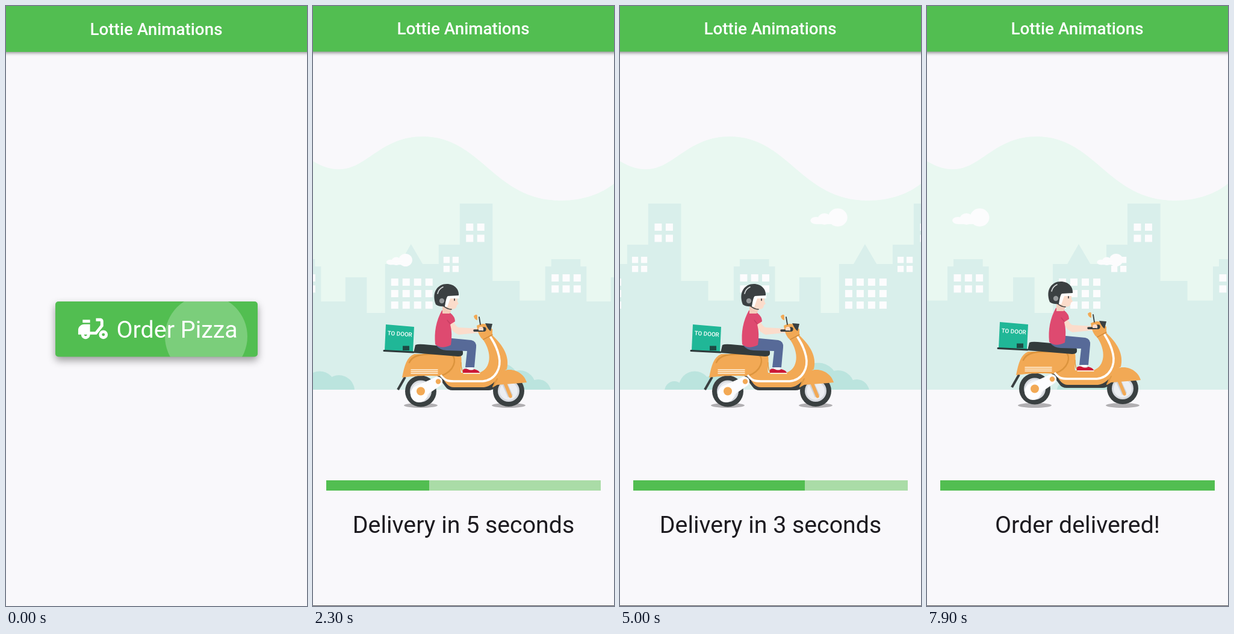
An HTML page with a canvas that plays this animation: 500 by 993 pixels, repeating every 8 s.

```html
<!DOCTYPE html>
<html lang="en">
<head>
<meta charset="utf-8">
<title>Lottie Animations</title>
<style>
html, body { margin: 0; width: 100%; height: 100%; overflow: hidden; background: #f9f8fb; }
canvas { position: absolute; left: 0; top: 0; width: 500px; height: 993px; display: block; }
</style>
</head>
<body>
<canvas id="home" width="500" height="993"></canvas>
<canvas id="order" width="500" height="993"></canvas>
<script>
const LOOP = 8, W = 500, H = 993, GROUND = 635;
const PAGE = '#f9f8fb', GREEN = '#52be51', DARK = '#3a4041', ORANGE = '#f2a955';
const SKIN = '#fbdccb', CITY = '#d9efeb', PALE = '#fcfcfd';
const home = document.getElementById('home').getContext('2d');
const orderCanvas = document.getElementById('order');
const order = orderCanvas.getContext('2d');
let g = home;

const clamp = v => Math.max(0, Math.min(1, v));
const mod = (a, b) => ((a % b) + b) % b;

function rect(x, y, w, h, color) {
  g.fillStyle = color;
  g.fillRect(x, y, w, h);
}
function oval(x, y, rx, ry, color) {
  g.fillStyle = color;
  g.beginPath();
  g.ellipse(x, y, rx, ry, 0, 0, Math.PI * 2);
  g.fill();
}
const dot = (x, y, r, color) => oval(x, y, r, r, color);
function shape(d, color) {
  g.fillStyle = color;
  g.fill(new Path2D(d), 'evenodd');
}
function line(d, width, color, cap = 'round') {
  g.strokeStyle = color;
  g.lineWidth = width;
  g.lineCap = cap;
  g.lineJoin = 'round';
  g.stroke(new Path2D(d));
}
function text(s, x, y, size, color, weight = 400, align = 'center') {
  g.font = `${weight} ${size}px Roboto, sans-serif`;
  g.textAlign = align;
  g.fillStyle = color;
  g.fillText(s, x, y);
}
function shadow(alpha, blur, dy) {
  g.shadowColor = `rgba(0,0,0,${alpha})`;
  g.shadowBlur = blur;
  g.shadowOffsetY = dy;
}
function frame(barHeight, baseline) {
  g.clearRect(0, 0, W, H);
  rect(0, 0, W, H, PAGE);
  g.save();
  shadow(.4, 5, 2);
  rect(-10, -10, W + 20, barHeight + 10, GREEN);
  g.restore();
  text('Lottie Animations', 249.5, baseline, 27.8, '#fff', 500);
}

function moped(x, y, scale) {
  g.save();
  g.translate(x, y);
  g.scale(scale, scale);
  shape('M19 7c0-1.1-.9-2-2-2h-3v2h3v2.65L13.52 14H10V9H6c-2.2 0-4 1.8-4 4v3h2c0 1.66 1.34 3 3 3s3-1.34 3-3h4.48L19 10.35zM7 17c-.55 0-1-.45-1-1h2c0 .55-.45 1-1 1z', '#fff');
  rect(5, 6, 5, 2, '#fff');
  dot(19, 16, 3, '#fff');
  dot(19, 16, 1, GREEN);
  g.restore();
}

function drawHome(t) {
  g = home;
  frame(76, 48);
  const button = new Path2D();
  button.roundRect(82, 489, 336, 91.5, 5);
  g.save();
  shadow(.38, 13, 6);
  g.fillStyle = GREEN;
  g.fill(button);
  g.restore();
  g.save();
  g.clip(button);
  dot(332.5, 547, 68 + t * 480, `rgba(255,255,255,${.24 * clamp(1.5 - t * 3)})`);
  g.restore();
  moped(115, 504.5, 2.46);
  text('Order Pizza', 183.5, 548.5, 39.4, '#fff', 400, 'left');
}

// distance the skyline has travelled, as [seconds, px]
const TRAVEL = [[0, -110], [1.5, 0], [3, 111], [4, 179], [5, 256], [6.1, 337], [7.1, 411]];
function travel(t) {
  for (let i = 1; i < TRAVEL.length; i++) {
    const [t0, d0] = TRAVEL[i - 1], [t1, d1] = TRAVEL[i];
    if (t < t1) return d0 + (d1 - d0) * (t - t0) / (t1 - t0);
  }
  return 411;
}

function windows(x, y, cols, rows, step, size) {
  for (let i = 0; i < cols; i++)
    for (let j = 0; j < rows; j++) rect(x + i * step, y + j * step, size, size, PALE);
}

// left, right and top of each block, measured from the tower
const BLOCKS = [[0, 54, 327], [-35, 0, 395], [-124, -35, 427], [54, 99, 455], [99, 142, 487.5],
  [142, 210, 431], [152, 200, 419], [210, 251, 489], [251, 286, 449], [286, 318, 508]];
function skyline(x) {
  g.save();
  g.translate(x, 0);
  g.fillStyle = CITY;
  g.beginPath();
  for (const [l, r, top] of BLOCKS) g.rect(l, top, r - l + .6, GROUND - top);
  g.moveTo(-100.5, 428);
  g.lineTo(-81, 394);
  g.lineTo(-61, 428);
  g.fill();
  windows(10.5, 360, 2, 2, 18.5, 12);
  windows(-27, 415, 2, 2, 15, 10.3);
  windows(-114, 451, 4, 3, 19, 12);
  windows(152.5, 444, 3, 2, 18.3, 12);
  g.restore();
}

function cloud(right, y, k) {
  oval(right - 16 * k, y, 16 * k, 15 * k, PALE);
  oval(right - 38 * k, y + 2.5 * k, 11 * k, 9.5 * k, PALE);
  oval(right - 52 * k, y + 5 * k, 9.5 * k, 6 * k, PALE);
  rect(right - 52 * k, y + 3 * k, 30 * k, 8 * k, PALE);
}

const BIG = [[19, 632, 19], [52, 623, 32.5], [85, 630, 27], [116, 639, 21]];
const SMALL = [[16, 637, 16], [50, 631, 26.5], [82, 637, 26]];
function bush(x, lobes) {
  for (const [dx, y, r] of lobes) dot(x + dx, y, r, '#bbe4de');
}

function scenery(d) {
  shape('M0 257C20 268 32 271 48 270C90 267 115 216 182 216C280 216 300 322 412 322C450 322 480 310 500 294V635H0Z', '#e9f8f1');
  const x = mod(303 - d, 441);
  for (const k of [-1, 0, 1]) skyline(x + k * 441);
  cloud(mod(51 - d * 1.77 + 200, 780) - 200, 350, 1);
  cloud(mod(271 - d * 1.79 + 200, 790) - 200, 420.5, .7);
  g.save();
  g.beginPath();
  g.rect(0, 500, W, GROUND - 500);
  g.clip();
  for (const [start, lobes] of [[427, BIG], [804, SMALL], [1007, BIG], [1387, SMALL]])
    bush(mod(start - d * 2.85 + 200, 1257) - 200, lobes);
  g.restore();
}

function wheel(x, y) {
  dot(x, y, 26, DARK);
  dot(x, y, 18, '#d6d9df');
  dot(x, y, 15, '#eceef2');
}

function box() {
  shape('M121 527L168 531L166 573L119 570Z', '#20b797');
  line('M118 570.5L167 573', 3, '#2e3a3b');
  rect(149, 562.5, 11, 7.5, '#1d4a44');
  g.save();
  g.translate(144, 546);
  g.rotate(.075);
  text('TO DOOR', 0, 0, 9.8, '#fff', 500);
  g.restore();
}

function scooter() {
  line('M153 614L141 635', 4, DARK, 'butt');
  wheel(179, 637.5);
  wheel(325, 637);
  // underside
  shape('M205 610L216 615L224 625H294L312 610L304 630Q299 636 291 636H232Q224 636 220 630Z', DARK);
  // rear cowl, floor and leg shield
  shape('M148 615C152 594 156 581 168 576H245C249 586 244 598 246 607H276C297 600 297 573 283 553L298 545C316 562 327 580 322 601L311 608C304 622 294 630 284 631H234C225 631 220 624 214 613C194 611 170 612 154 614Z', ORANGE);
  line('M160 590C166 577 182 576 200 576H230C240 585 235 604 213 612', 2.6, '#dc943d');
  for (const y of [602, 605, 608]) line(`M163 ${y}H207`, 1.5, '#fff4e2');
  line('M213 612C219 620 224 621 234 621H282C304 619 313 598 309 580C306 565 300 556 295 548', 3.6, '#fff');
  line('M246 590Q246 604 251 608H278', 1.4, '#e39b43');
  // swing arm
  shape('M169 630L202 615A8 8 0 0 1 212 628L190 643A14 14 0 1 1 169 630Z', '#fdfdff');
  dot(179, 637.5, 7, ORANGE);
  dot(208, 621.5, 4.2, ORANGE);
  // front fork and fender
  line('M317 622L328 646', 9, '#cfd2d8', 'butt');
  line('M318 622L328 646', 5.5, ORANGE);
  shape('M299 631C303 612 312 602 326 602C341 602 352 612 355 623L345 624L306 627Z', ORANGE);
  line('M299 630L306 617', 2, '#e09a44');
  // seat
  shape('M167 574L170 561Q174 559 184 560L240 565Q250 566 249 576Q248 580 241 580Z', '#333b3c');
}

function head() {
  shape('M215 491H231V500L227 509H215Z', '#f4cdbb');
  shape('M220 478H240V489L242 493L239 495Q239 502 231 502Q221 500 220 490Z', SKIN);
  shape('M219 478H243V484H228L223 498L214 496Z', '#fff');
  shape('M204 494C196 473 208 460 222 460C236 460 243 470 242 479L224 480Q221 482 219 497Q210 498 204 494Z', '#3b4042');
  line('M207 476Q209 468 216 465', 1.6, '#dfe2e3');
  dot(214, 488, 4.2, '#96999b');
  line('M216 496Q223 502 230 502', 1.6, DARK);
  oval(235, 486, .9, 2.2, '#39393d');
}

function rider() {
  line('M261 596V602', 9, '#fff', 'butt');
  shape('M249 607V602Q252 599 257 601Q263 604 268 601Q276 603 277 607Z', '#cb1837');
  line('M250 608H277', 1.5, '#fff');
  shape('M205 562Q214 549 231 550L263 553Q272 555 271 565L268 598H253L256 571L222 570Q210 569 205 562Z', '#576a98');
  shape('M224 523L233 520Q236 530 242 532L276 534L286 530L289 537L283 542L272 541L242 544Q230 540 224 523Z', SKIN);
  shape('M214 504Q219 501 228 508Q236 514 236 522L228 527Q232 542 229 561Q213 569 203 560Q200 529 214 504Z', '#de4a70');
  line('M228 526L223 520', 1.2, '#c53c60');
  head();
}

function handlebar() {
  shape('M272 529Q280 524 289 527L298 535L298 545L283 553Q274 546 272 529Z', ORANGE);
  line('M283 552L298 544', 1.5, '#d58c39');
  shape('M286 525L298 526L295 538Q291 536 286 525Z', DARK);
  dot(284, 535, 3.7, DARK);
  line('M268 537H284', 3.6, DARK);
  dot(279, 535, 4.2, SKIN);
  line('M268 538H281', 2.2, DARK);
  line('M278 527L276 515', 1.8, DARK);
  shape('M267 513Q273 508 273 514V520Q268 519 267 513Z', ORANGE);
}

function drawOrder(t) {
  g = order;
  const d = travel(t);
  const left = Math.max(0, 7 - Math.floor(t - .08));
  frame(75.5, 47);
  scenery(d);
  for (const x of [179, 325]) oval(x, 661, 28, 4, '#b1afb2');
  const off = (mod(d - 411 + 220, 441) - 220) / 15;
  const hop = Math.abs(off) < 1 ? Math.cos(off * Math.PI / 2) ** 2 : 0;
  g.save();
  g.translate(0, -4 * hop);
  box();
  scooter();
  rider();
  handlebar();
  g.restore();
  rect(22, 785, 456, 17, '#aadca7');
  rect(22, 785, 57 * (8 - left), 17, GREEN);
  text(left ? `Delivery in ${left} seconds` : 'Order delivered!', 250, 872, 39.3, '#1d1b20');
  rect(0, 992, W, 1, '#57565a');
}

function render(t) {
  const enter = clamp((t - .15) / .3);
  drawHome(t);
  orderCanvas.style.opacity = enter * enter;
  orderCanvas.style.transform = `translateY(${248 * (1 - enter) ** 3}px)`;
  if (enter > 0) drawOrder(t);
}

const start = performance.now();
function tick() {
  render(mod((performance.now() - start) / 1000, LOOP));
  requestAnimationFrame(tick);
}
tick();
</script>
</body>
</html>
```
